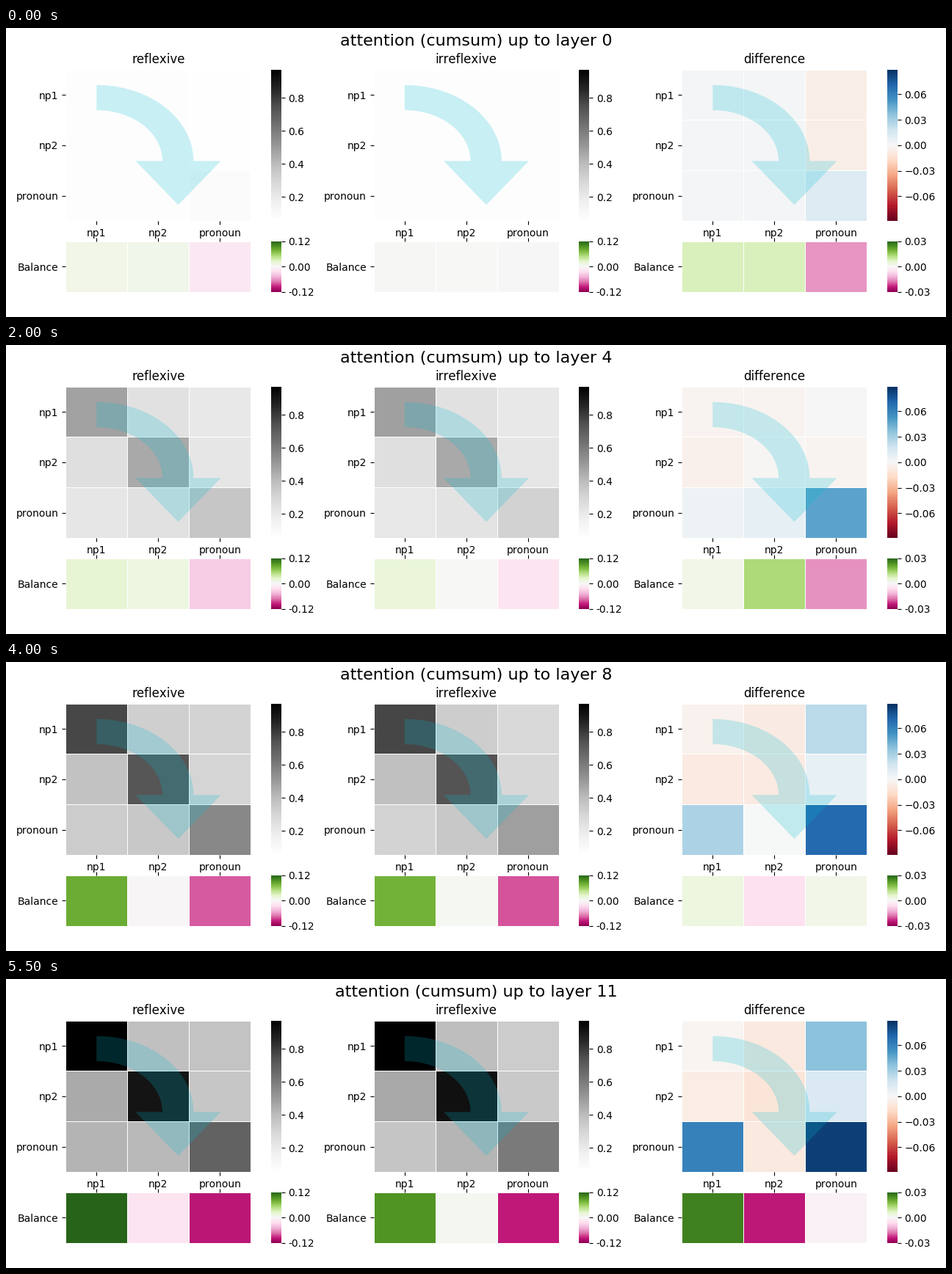
Write a matplotlib script that moves like this. It is 1280 px wide and 394 px high and loops after 6000 ms.

```python
import numpy as np
import matplotlib.pyplot as plt
from matplotlib.animation import FuncAnimation
from matplotlib.patches import Polygon

W, H, DPI = 1280, 394, 100
LAYERS = 12
NAMES = ["reflexive", "irreflexive", "difference"]
TOKENS = ["np1", "np2", "pronoun"]
GREY_MIN, GREY_MAX, DIFF_MAX = 0.053, 0.971, 0.089
MAP_W, MAP_H, BALANCE_H = 252.2, 206.5, 68.8

# Key matrices, as fractions of their colour scales.
GREY_END = np.array([[1, .37, .31], [.445, .945, .32], [.34, .40, .60]])
DIFF_START = np.array([.02, .02, -.065])
DIFF_MID = np.array([[-.06, -.05, 0], [-.10, -.03, -.06], [.10, .18, 0]])
DIFF_END = np.array([[-.02, -.10, .41], [-.07, -.13, .15], [.68, -.10, 0]])
DIFF_END_CENTER = np.array([8.3, 7.7, 7.6])


def surge(layer, center, width):
    return 1 / (1 + np.exp(-(layer - center) / width))


def irreflexive(layer):
    """The symmetric part grows by a power law, the imbalance surges midway."""
    progress = layer / (LAYERS - 1)
    even, skew = (GREY_END + GREY_END.T) / 2, (GREY_END - GREY_END.T) / 2
    growth = progress ** (0.68 + 0.1 * np.eye(3))
    share = 0.02 + (even - 0.02) * growth + skew * surge(layer, 6, 1.4)
    return GREY_MIN + (GREY_MAX - GREY_MIN) * share


def difference(layer):
    late = surge(layer, DIFF_END_CENTER, 0.6)
    share = DIFF_START * np.exp(-layer) + DIFF_END * late
    share += DIFF_MID * surge(layer, 4, 0.5) * (1 - late)
    share[2, 2] = 0.14 + 0.8 * (layer / (LAYERS - 1)) ** 0.7
    return DIFF_MAX * share


def attention(layer):
    base, diff = irreflexive(layer), difference(layer)
    return dict(zip(NAMES, (base + diff, base, diff)))


def balance_of(matrix):
    """Attention received minus attention given, per token."""
    return (matrix.sum(axis=0) - matrix.sum(axis=1)).reshape(1, 3)


plt.rcParams.update({"font.family": "DejaVu Sans", "text.kerning_factor": 6})
fig = plt.figure(figsize=(W / DPI, H / DPI), dpi=DPI, facecolor="white")
heading = fig.suptitle("", fontsize=16)


def pixel_axes(left, top, width, height):
    return fig.add_axes([left / W, 1 - (top + height) / H, width / W, height / H])


def heatmap(left, top, height, labels, cmap, vmin, vmax):
    ax = pixel_axes(left, top, MAP_W, height)
    mesh = ax.pcolormesh(np.zeros((len(labels), 3)), cmap=cmap, vmin=vmin, vmax=vmax,
                         edgecolors="white", linewidth=0.5)
    ax.invert_yaxis()
    ax.set_xticks(np.arange(3) + 0.5, TOKENS)
    ax.set_yticks(np.arange(len(labels)) + 0.5, labels)
    ax.spines[:].set_visible(False)
    return ax, mesh


def color_scale(mesh, left, top, height, ticks, labels):
    bar = fig.colorbar(mesh, cax=pixel_axes(left + 279.7, top, 13.7, height))
    bar.outline.set_visible(False)
    bar.set_ticks(ticks, labels=labels)


def curved_arrow(ax):
    """Quarter-ellipse band ending in a downward head, in pixels from the panel corner."""
    t = np.linspace(0, np.pi / 2, 60)
    cx, cy = 42.1, 124.7
    outer = np.column_stack([cx + 132 * np.sin(t), cy - 103.5 * np.cos(t)])
    inner = np.column_stack([cx + 89.7 * np.sin(t), cy - 69.3 * np.cos(t)])[::-1]
    head = [(211.3, cy), (153.3, 184.5), (95.3, cy)]
    points = np.vstack([outer, head, inner]) / [MAP_W, MAP_H]
    points[:, 1] = 1 - points[:, 1]
    ax.add_patch(Polygon(points, transform=ax.transAxes, facecolor="#00bcd4",
                         edgecolor="none", alpha=0.21, zorder=3))


def build_panel(index, name):
    left, top, low_top = 81.2 + 419.5 * index, 56.6, 290.8
    if name == "difference":
        style, limit = ("RdBu", -DIFF_MAX, DIFF_MAX), 0.03
        ticks = [-0.06, -0.03, 0, 0.03, 0.06]
        labels = [f"{v:.2f}".replace("-", "\u2212") for v in ticks]
    else:
        style, limit = ("Greys", GREY_MIN, GREY_MAX), 0.12
        ticks = [0.2, 0.4, 0.6, 0.8]
        labels = [f"{v:.1f}" for v in ticks]

    ax, main = heatmap(left, top, MAP_H, TOKENS, *style)
    ax.set_title(name, fontsize=12)
    color_scale(main, left, top, MAP_H, ticks, labels)
    curved_arrow(ax)

    ax, balance = heatmap(left, low_top, BALANCE_H, ["Balance"], "PiYG", -limit, limit)
    ax.tick_params(axis="x", top=True, bottom=False, labelbottom=False)
    ends = [-limit, 0, limit]
    color_scale(balance, left, low_top, BALANCE_H, ends, [f"{v:.2f}" for v in ends])
    return main, balance


panels = {name: build_panel(i, name) for i, name in enumerate(NAMES)}


def update(layer):
    heading.set_text(f"attention (cumsum) up to layer {layer}")
    for name, matrix in attention(layer).items():
        main, balance = panels[name]
        main.set_array(matrix)
        balance.set_array(balance_of(matrix))


anim = FuncAnimation(fig, update, frames=LAYERS, interval=500, repeat=True,
                     repeat_delay=0, init_func=lambda: update(0))
plt.show()
```
